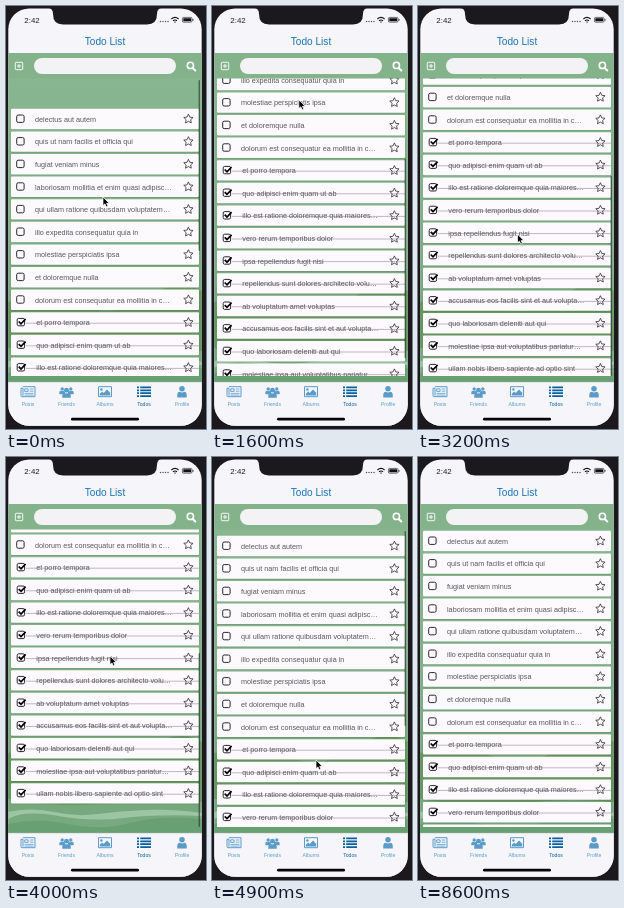
Recreate the animation shown at these times as an HTML page. Size 200 px wide and 423 px high, loop 8.8 s.

```html
<!DOCTYPE html>
<html lang="en">
<head>
<meta charset="utf-8">
<title>Todo List</title>
<style>
  html, body { margin: 0; width: 100%; height: 100%; overflow: hidden; background: #1b191d; }
  svg { display: block; width: 100%; height: 100%; }
  text { font-family: "Liberation Sans", Arial, sans-serif; }
  .row text { font-size: 7.24px; fill: #59575c; }
  .tab text { font-size: 5.1px; text-anchor: middle; }
  .tab { color: #5a9bc8; fill: currentColor; }
  .tab.on { color: #0b609f; }
</style>
</head>
<body>
<svg viewBox="0 0 200 423" preserveAspectRatio="none">
  <defs>
    <linearGradient id="haze" x1="0" y1="0" x2="0" y2="1">
      <stop offset="0" stop-color="#87b690"/>
      <stop offset=".5" stop-color="#80af87"/>
      <stop offset=".8" stop-color="#74a578"/>
      <stop offset="1" stop-color="#78ab80"/>
    </linearGradient>
    <clipPath id="screen"><rect x="2.3" y="2.4" width="193.4" height="417.4" rx="21"/></clipPath>
    <clipPath id="view"><rect x="2" y="72" width="194" height="298"/></clipPath>
  </defs>

  <g clip-path="url(#screen)">
    <rect x="2" y="2" width="194" height="418" fill="#f6f5fa"/>

    <rect x="2" y="72" width="194" height="304" fill="url(#haze)"/>
    <path d="M2 296Q40 284 74 299T140 292T196 285V345Q150 341 104 346T2 342Z" fill="#66965f"/>
    <path d="M2 355Q26 350 48 355T92 357T140 353T196 356V359Q150 357 118 361T52 359T2 362Z" fill="#9cc6a3"/>
    <path d="M2 367Q30 360 62 367T124 366T196 362V376H2Z" fill="#68a074"/>
    <g clip-path="url(#view)">
      <g id="list"></g>
    </g>
    <rect id="thumb" x="192.6" width="1.4" rx=".7" fill="#26372b"/>

    <rect x="2" y="47" width="194" height="25.5" fill="#84b38b"/>
    <rect x="28" y="52" width="142" height="16" rx="8" fill="#f3f2f4"/>
    <g fill="none" stroke="#fff">
      <rect x="9.3" y="56.3" width="7.4" height="7.4" rx=".8" stroke-width=".9"/>
      <path d="M13 58V62M11 60H15" stroke-width=".9"/>
      <circle cx="184.4" cy="59.4" r="3.1" stroke-width="1.6"/>
      <path d="M186.8 62L189.3 64.5" stroke-width="2" stroke-linecap="round"/>
    </g>
    <rect id="caret" x="33.4" y="55.3" width="1" height="9.4" fill="#5978d8"/>

    <text x="99" y="39.3" font-size="10.1" text-anchor="middle" fill="#1a73b2">Todo List</text>
    <text x="18.3" y="16.6" font-size="7.9" fill="#222">2:42</text>
    <g fill="#555">
      <circle cx="154.5" cy="15.5" r=".75"/><circle cx="157" cy="15.5" r=".75"/>
      <circle cx="159.5" cy="15.5" r=".75"/><circle cx="162" cy="15.5" r=".75"/>
    </g>
    <g fill="none" stroke="#111" stroke-width="1.1">
      <path d="M165.4 13Q169 9.8 172.6 13M167 14.8Q169 13.2 171 14.8"/>
      <path d="M169 15.6V16.8"/>
      <rect x="176.4" y="11.4" width="9.6" height="4.8" rx="1.2" stroke-width=".6"/>
    </g>
    <path d="M177.3 12.3H185.1V15.3H177.3ZM186.6 13H187.4V14.8H186.6Z" fill="#111"/>

    <rect x="2" y="376" width="194" height="44" fill="#f6f6fa"/>
    <path d="M2 376.2H196" stroke="#bfc4c5" stroke-width=".5"/>
    <g id="tabs"></g>
    <rect x="65" y="411.8" width="68" height="2.8" rx="1.4" fill="#050505"/>
  </g>
  <path d="M43 2Q47 3 47 8Q47 18.5 57 18.5H141Q151 18.5 151 8Q151 3 155 2Z" fill="#1b191d"/>
  <path id="cursor" d="M0 0V8.6L2 6.9L3.3 9.8L4.9 9.1L3.6 6.3H6.3Z" fill="#000" stroke="#fff" stroke-width=".7"/>
</svg>
<script>
const LOOP = 8800, STEP = 100, PITCH = 22.6, TOP = 84, BOTTOM = -67;
const $ = id => document.getElementById(id);

const pending = [
  "delectus aut autem", "quis ut nam facilis et officia qui", "fugiat veniam minus",
  "laboriosam mollitia et enim quasi adipisc…", "qui ullam ratione quibusdam voluptatem…",
  "illo expedita consequatur quia in", "molestiae perspiciatis ipsa",
  "et doloremque nulla", "dolorum est consequatur ea mollitia in c…"
];
const done = [
  "et porro tempora", "quo adipisci enim quam ut ab", "illo est ratione doloremque quia maiores…",
  "vero rerum temporibus dolor", "ipsa repellendus fugit nisi",
  "repellendus sunt dolores architecto volu…", "ab voluptatum amet voluptas",
  "accusamus eos facilis sint et aut volupta…", "quo laboriosam deleniti aut qui",
  "molestiae ipsa aut voluptatibus pariatur…", "ullam nobis libero sapiente ad optio sint"
];

function star(cx, cy, r) {
  const points = Array.from({ length: 10 }, (_, i) => {
    const a = (i / 5 - 0.5) * Math.PI, d = i % 2 ? r * 0.48 : r;
    return (cx + d * Math.cos(a)).toFixed(2) + "," + (cy + d * Math.sin(a)).toFixed(2);
  });
  return `<polygon points="${points.join(" ")}" fill="none" stroke="#302e32" stroke-width=".8" stroke-linejoin="round"/>`;
}

function row(label, i) {
  const checked = i >= pending.length;
  const box = `<rect x="${checked ? 11.2 : 10.7}" y="-4" width="7.4" height="7.4" rx="1.5" fill="none" stroke="#29262c" stroke-width="1"/>`;
  const mark = checked
    ? `<path d="M12.7 -.9L15 1.4L19.6 -3.4" fill="none" stroke="#000" stroke-width="1.7"/>
       <path d="M20 .8H193" stroke="#a49aa6" stroke-width=".7"/>` : "";
  return `<g class="row" transform="translate(0 ${i * PITCH})">
    <rect x="5" y="-9.7" width="188.4" height="20.8" rx="1" fill="#436849" opacity=".25"/>
    <rect x="5" y="-10.2" width="188" height="20.4" rx="1" fill="#fcfafd"/>
    ${box}${mark}<text x="${checked ? 30.3 : 29}" y="2.7">${label}</text>${star(182.4, 0, 4.9)}</g>`;
}

const person = (x, y, s) => `<g transform="translate(${x} ${y}) scale(${s})">
  <circle cy="-3" r="2.9"/><path d="M-5 6V3.5Q-5 .2 -2.5 0Q0 1.6 2.5 0Q5 .2 5 3.5V6Z"/></g>`;
const line = (d, w = 1) => `<path d="${d}" fill="none" stroke="currentColor" stroke-width="${w}"/>`;

const tabs = [
  ["Posts", 22, line("M-5 -5H7V5H-6Q-7 5 -7 4V-3.5H-5V4") + line("M1.7 -2.7H5.5M1.7 -.5H5.5M-3.5 1.7H5.5M-3.5 3.4H5.5", .8)
    + line("M-3.3 -2.8H.1V-.3H-3.3Z", .9)],
  ["Friends", 60.5, person(-4.3, -1, .58) + person(4.3, -1, .58) + person(0, 1, .85)],
  ["Albums", 99, line("M-6.5 -5H6.5V5H-6.5Z") + `<circle cx="-3.6" cy="-2.2" r="1.2"/><path d="M-5.2 3.7V2L-2.8 -.2L-1.3 1.2L2 -2.3L5.2 1V3.7Z"/>`],
  ["Todos", 138, line("M-3.8 -4.3H7M-3.8 -1.4H7M-3.8 1.5H7M-3.8 4.4H7", 1.8) + line("M-7 -4.3H-5M-7 -1.4H-5M-7 1.5H-5M-7 4.4H-5", 1.8)],
  ["Profile", 176, person(0, 0, .95)]
];

$("list").innerHTML = [...pending, ...done].map(row).join("");
$("tabs").innerHTML = tabs.map(([name, x, icon]) =>
  `<g class="tab ${name === "Todos" ? "on" : ""}" transform="translate(${x} 385.7)">${icon}<text y="14.3">${name}</text></g>`).join("");

// Keys are [time, ...values]: drag, glide to the end, pull past it, flick back and bounce.
const scroll = [
  [0, 113], [200, 113], [500, 99], [800, 64], [1000, 33], [1200, -1], [1400, -25], [1700, -46],
  [2000, -58], [2400, -66.5], [2600, BOTTOM], [3600, BOTTOM], [4000, -93], [4200, -55],
  [4400, 43], [4600, 89], [4700, 94], [4900, 89], [5100, 85], [5300, TOP]
];
const pointer = [
  [0, 97, 191], [200, 97, 191], [500, 94, 172], [800, 89, 128], [1000, 86, 96], [1100, 85, 86],
  [1500, 86, 88], [2400, 93.5, 141], [3400, 101, 250], [3600, 101, 250], [4000, 104, 199],
  [4400, 104, 295], [4900, 104, 303], [5300, 163, 142], [5500, 183, 72], [5600, 183, 72],
  [5800, 195, 1.5], [6200, 195, 1.5], [6800, 116, 57], [7200, 116, 57], [8100, 189.5, 50]
];

function at(keys, t) {
  const i = keys.findIndex(k => k[0] > t);
  if (i < 0) return keys[keys.length - 1].slice(1);
  const a = keys[i - 1], b = keys[i], p = (t - a[0]) / (b[0] - a[0]);
  return a.slice(1).map((v, j) => v + (b[j + 1] - v) * p);
}

const clamp = (v, lo = 0, hi = 1) => Math.min(hi, Math.max(lo, v));

// The caret appears on focus, then fades off and on every half second.
function caretAlpha(t) {
  if (t < 7000) return 0;
  const phase = (t - 7000) % 1000;
  return phase < 500 ? clamp((phase + 100) / 200) : clamp((600 - phase) / 200);
}

function draw(t) {
  const [y] = at(scroll, t), [x, top] = at(pointer, t);
  $("list").setAttribute("transform", `translate(0 ${y})`);

  const over = Math.max(0, y - TOP, BOTTOM - y);
  const length = 200 - over;
  const progress = clamp((TOP - y) / (TOP - BOTTOM));
  $("thumb").setAttribute("y", 74 + progress * (296 - length));
  $("thumb").setAttribute("height", length);
  $("thumb").setAttribute("opacity", 0.65 * clamp((5600 - t) / 300));

  $("caret").setAttribute("opacity", caretAlpha(t));
  $("cursor").setAttribute("transform", `translate(${x} ${top})`);
  $("cursor").setAttribute("visibility", t < 8200 ? "visible" : "hidden");
}

const start = performance.now();
function tick() {
  const t = (performance.now() - start) % LOOP;
  draw(Math.floor(t / STEP) * STEP);
  requestAnimationFrame(tick);
}
tick();
</script>
</body>
</html>
```
